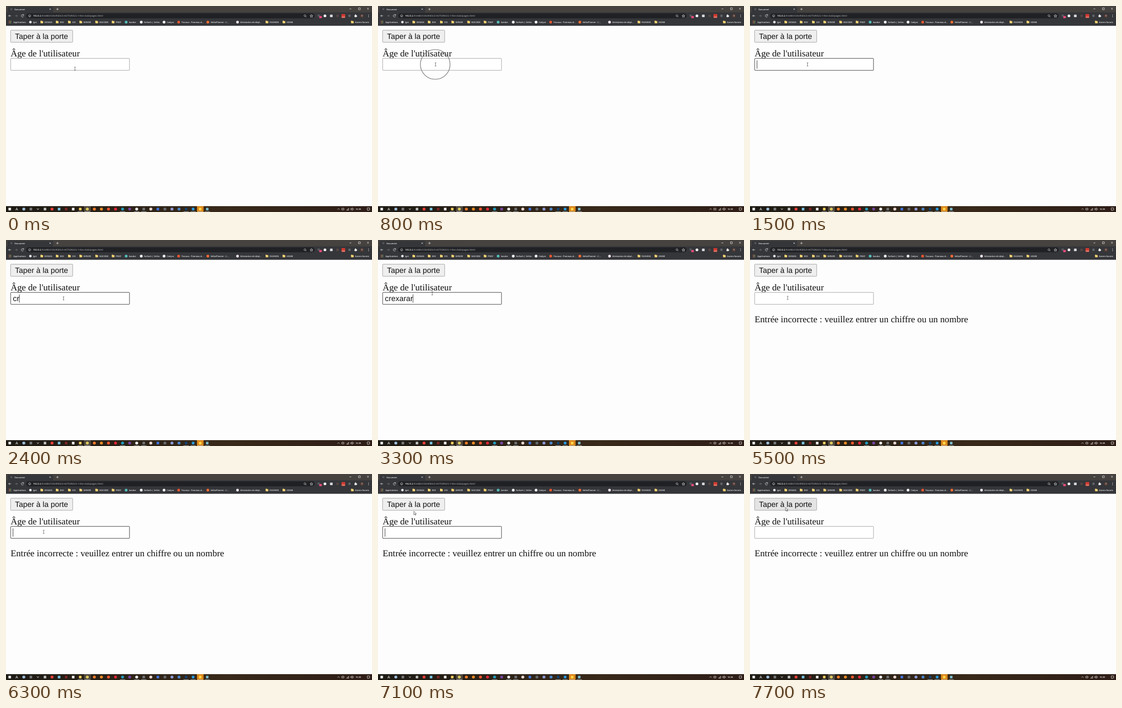
An HTML page that plays this animation: 690 by 388 pixels, repeating every 8000 ms.

```html
<!DOCTYPE html>
<html lang="fr">
<head>
<meta charset="utf-8">
<title>Document</title>
<style>
html, body { margin: 0; width: 100%; height: 100%; overflow: hidden; background: #fdfdfd; }
svg { display: block; width: 100vw; height: 100vh; }
text { white-space: pre; text-rendering: geometricPrecision; }
.ui { font: 600 3.95px "Open Sans", "Noto Sans", sans-serif; fill: #eee; }
.form { font: 14.4px "Liberation Sans", Arial, sans-serif; fill: #111; }
.page { font: 17.25px "Liberation Serif", "Times New Roman", serif; fill: #111; }
.line { fill: none; stroke: #e2e2e2; stroke-width: .75; }
</style>
</head>
<body>
<svg viewBox="0 0 690 388">
  <linearGradient id="bar">
    <stop stop-color="#1d1a14"/>
    <stop offset=".6" stop-color="#38291a"/>
    <stop offset="1" stop-color="#2e1d17"/>
  </linearGradient>
  <g id="chrome"></g>
  <g id="page">
    <rect id="button" x="8.7" y="45.6" width="117" height="22.7" rx=".8" stroke="#a3a3a3" stroke-width=".9"/>
    <text class="form" x="17" y="62">Taper à la porte</text>
    <text class="page" x="8.7" y="95">Âge de l'utilisateur</text>
    <rect id="field" x="8.8" y="98.7" width="224" height="22.5" rx=".8" fill="#fff" stroke-width=".9"/>
    <text id="value" class="form" x="13" y="115"></text>
    <path id="caret" d="M0 102.5V118" stroke="#111" stroke-width=".8"/>
    <text id="error" class="page" x="8.7" y="154.8">Entrée incorrecte : veuillez entrer un chiffre ou un nombre</text>
  </g>
  <circle id="ring" fill="none" stroke="#777" stroke-width="1.1"/>
  <path id="beam" d="M-1.5 -3H1.5M0 -3V3M-1.5 3H1.5" fill="none" stroke="#555" stroke-width=".7"/>
  <path id="arrow" d="M0 0V6.5L1.6 5.1L2.6 7.4L3.7 7L2.7 4.7H4.8Z" fill="#fff" stroke="#222" stroke-width=".6"/>
</svg>
<script>
const LOOP = 8000, STEP = 100;
const $ = id => document.getElementById(id);
const set = (el, attrs) => { for (const k in attrs) el.setAttribute(k, attrs[k]); };

// Static browser and taskbar parts
const parts = [];
const rect = (x, y, w, h, fill, rx = 0) =>
  parts.push(`<rect x="${x}" y="${y}" width="${w}" height="${h}" rx="${rx}" fill="${fill}"/>`);
const dot = (x, y, r, fill) => parts.push(`<circle cx="${x}" cy="${y}" r="${r}" fill="${fill}"/>`);
const line = d => parts.push(`<path class="line" d="${d}"/>`);
const label = (x, y, s, style = "") => parts.push(`<text class="ui" x="${x}" y="${y}" style="${style}">${s}</text>`);

function drawTop() {
  rect(0, 0, 690, 13, "#45423f");
  rect(3, 1.5, 86, 13, "#35363a", 2.5);
  rect(0, 12, 690, 25.3, "#35363a");
  dot(10, 6, 2, "#55575b");
  label(16, 7.6, "Document");
  line("M82 4.7L84.6 7.3M84.6 4.7L82 7.3M94.8 6H99.2M97 3.8V8.2");
  line("M647.5 5.5H651M664.5 3.5H668V7H664.5ZM680.7 3.5L684 6.8M684 3.5L680.7 6.8");

  line("M9.5 18.5H5M7 16.5L5 18.5L7 20.5");
  line("M33 17.2A2.3 2.3 0 1 0 33.2 19.5M33.3 15.6V17.6H31.3");
  parts.push('<path class="line" style="stroke:#77797c" d="M17 18.5H21.5M19.5 16.5L21.5 18.5L19.5 20.5"/>');
  rect(38, 13.8, 544, 9.4, "#202124", 4.7);
  line("M44.5 16.4A2.1 2.1 0 1 0 44.6 16.4M44.5 18.2V19.8");
  label(51, 20.1, '192.0.2.1<tspan fill="#9a9da1">:4400/COURSES/2-ACTIONS/2.1-the-club/pages.html</tspan>', "font-size:4.55px");
  line("M563.5 16.5A1.7 1.7 0 1 0 563.6 16.5M564.8 19.5L566.3 21");
  line("M575.8 16L576.6 17.8L578.5 18L577.1 19.3L577.5 21.2L575.8 20.2L574.1 21.2L574.5 19.3L573.1 18L575 17.8Z");
  rect(587.5, 16, 4, 4, "#555b5f", .5);
  rect(590.5, 18.8, 5, 4.2, "#e34a78", 1);
  dot(601.3, 18.5, 2.6, "#f2f2f2");
  rect(610.8, 16.2, 5, 4.8, "#d8dadd", .7);
  dot(625, 18.5, 2.5, "#554642");
  rect(632.5, 15.2, 7, 7.2, "#d63b2f", .8);
  label(633, 21.5, "0.00", "font-size:3px");
  dot(647.5, 18.5, 2.4, "#626468");
  rect(657, 17, 4, 4, "#e2e2e2", .4);
  dot(659, 16.7, 1, "#e2e2e2");
  dot(661.2, 19, 1, "#e2e2e2");
  dot(671, 18.5, 3.1, "#5d4037");
  label(669.9, 20, "T");
  for (const y of [16.6, 18.5, 20.4]) dot(683.5, y, .55, "#ddd");
}

function drawBookmarks() {
  const mark = (x, s) => label(x, 31.7, s);
  for (let i = 0; i < 9; i++)
    dot(5.8 + i % 3 * 1.8, 28.5 + Math.floor(i / 3) * 1.8, .65, ["#d66b60", "#d9b654", "#73a879"][i % 3]);
  mark(14, "Applications");
  dot(46, 30.3, 2.4, "#e4e8ea");
  mark(51, "!get");
  const folders = [[65, "DESIGN"], [94, "DEV"], [117, "CSS"], [138.5, "SERVER"], [168.5, "NOCODE"],
    [199.5, "PROF"], [489.5, "FASHION"], [521.5, "HOME"], [650.5, "Autres favoris"]];
  for (const [x, s] of folders) {
    rect(x, 27.7, 2.6, 2, "#f5d675", .4);
    rect(x, 28.4, 5, 4.1, "#f5d675", .4);
    mark(x + 7.6, s);
  }
  const sites = [[226.5, "#55bcb8", "kandor"], [255, "#f4f4f4", "forEach | Velito"], [298, "#f4f4f4", "Codyra"],
    [325.5, "#e55730", "Travaux - Panneau d..."], [380.5, "#ef6b35", "VelkoPlanner - L'..."],
    [436.5, "#e9dfe6", "Attestation de dépl..."]];
  for (const [x, fill, s] of sites) {
    dot(x, 30.3, 2.6, fill);
    mark(x + 5.2, s);
  }
}

function drawTaskbar() {
  rect(0, 377, 690, 11, "url(#bar)");
  rect(147, 377, 13, 11, "#51483f");
  rect(360, 377, 12.5, 11, "#d9861c");
  // Icon colours, evenly spaced; "r" marks a square one
  const icons = ("#eeer #ccc #9dbbd6 #777r #aaa #bbbr #e8403a #79bfe0r #7b2525r #eeeeeer #f2cb61r #d7c75b " +
    "#f27b2c #ed8a25 #ef5530 #df2638 #2499ba #75459b #e8e8e8 #6e7174r #e7d5d1 #3f72d5r #64676c " +
    "#8c98d5 #4b84c7 #15416dr #2998dar #ffd34ar #78b8c9r").split(" ");
  icons.forEach((c, i) => {
    const x = 7 + i * 13.3, square = c.endsWith("r"), fill = c.replace("r", "");
    if (i === 1) line("M18.2 385L20.3 380L22.4 385M19 383.5H21.6");
    else if (i === 4) line("M58.4 381L60.2 384L62 381");
    else if (square) rect(x - 2.4, 380, 4.8, 5, fill, .4);
    else dot(x, 382.5, 2.8, fill);
    if ([10, 11, 16, 18, 19, 25, 26, 27, 28].includes(i)) rect(x - 5, 387.1, 10, .9, "#a7b6bd");
  });
  line("M625 383.5L627 381.5L629 383.5M633.2 381H637V384H633.2ZM642.3 384.5L646 380.8V384.5Z");
  line("M650 381.5H651.3L653 380V385L651.3 383.5H650ZM654.5 381Q656 382.5 654.5 384");
  label(659, 384.2, "16:30", "font-size:4px");
  line("M681 380.3H685.5V384.3H683.5L682.5 385.4V384.3H681Z");
}

drawTop();
drawBookmarks();
drawTaskbar();
$("chrome").innerHTML = parts.join("");

// [start, end, x, y] of each pointer move
const moves = [[100, 600, 108.5, 110], [3100, 3800, 77, 62], [5000, 5500, 71, 109], [6500, 7300, 67, 63]];
// [time, typed text]; every key restarts the caret blink
const typing = [[1200, ""], [2200, "c"], [2400, "cr"], [2500, "crexa"], [2700, "crexar"],
  [2800, "crexara"], [2900, "crexarar"], [4000, ""], [6000, ""]];
const within = (t, a, b) => t >= a && t < b;

function pointer(t) {
  let x = 130, y = 118;
  for (const [a, b, tx, ty] of moves) {
    const p = Math.min(1, Math.max(0, (t - a) / (b - a))), e = p * p * (3 - 2 * p);
    x += (tx - x) * e;
    y += (ty - y) * e;
  }
  return [x, y];
}

function render(t) {
  const [x, y] = pointer(t);
  const overText = y > 79, hover = y < 69;
  const pressed = within(t, 3900, 4000) || within(t, 7500, 7700);
  const focused = within(t, 1200, 3900) || within(t, 6000, 7500);
  const [keyTime, typed] = typing.filter(k => k[0] <= t).pop() || [0, ""];

  set($("button"), { fill: pressed ? "#f5f5f5" : hover ? "#e4e4e4" : "#efefef" });
  set($("field"), { stroke: focused ? "#3a3a3a" : "#a3a3a3" });
  $("value").textContent = typed;
  const end = 13.2 + (typed ? $("value").getComputedTextLength() : 0);
  set($("caret"), {
    transform: `translate(${end})`,
    visibility: focused && (t - keyTime) % 1000 < 500 ? "visible" : "hidden"
  });
  set($("error"), { visibility: t >= 4000 ? "visible" : "hidden" });
  set($("ring"), { cx: x - .6, cy: y, r: 28 - (t - 800) * .14, visibility: within(t, 700, 1000) ? "visible" : "hidden" });
  set($("beam"), { transform: `translate(${x} ${y})`, visibility: overText ? "visible" : "hidden" });
  set($("arrow"), { transform: `translate(${x} ${y})`, visibility: overText ? "hidden" : "visible" });
}

const begin = performance.now();
function tick() {
  const t = (performance.now() - begin) % LOOP;
  render(Math.floor(t / STEP) * STEP);
  requestAnimationFrame(tick);
}
tick();
</script>
</body>
</html>
```
